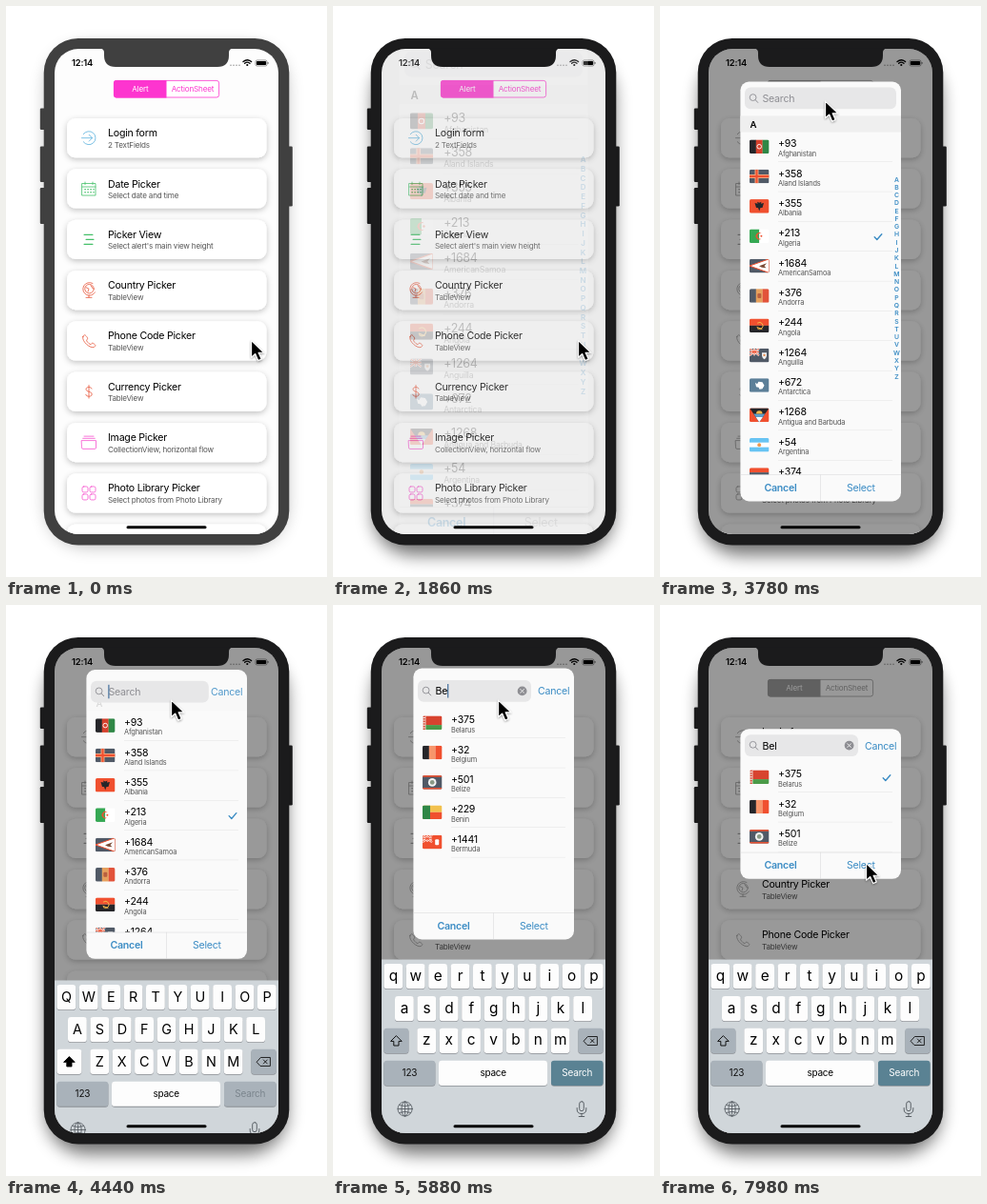
Animation, 337 px wide and 600 px high, one loop 8 s. Source, as an HTML page:

```html
<!DOCTYPE html>
<html lang="en">
<head>
<meta charset="utf-8">
<title>Country picker demo</title>
<style>
  html, body { margin: 0; width: 100%; height: 100%; overflow: hidden; background: #fff; }
  svg { display: block; width: 100vw; height: 100vh; }
  text { font-family: Inter, "Liberation Sans", sans-serif; letter-spacing: -.022em; white-space: pre; }
</style>
</head>
<body>
<svg viewBox="0 0 337 600">
  <defs>
    <clipPath id="screen"><rect x="51" y="45" width="235" height="510" rx="25"/></clipPath>
    <clipPath id="flag"><rect width="20.5" height="14.6" rx="1.6"/></clipPath>
    <filter id="soft" x="-20%" y="-20%" width="140%" height="150%"><feGaussianBlur stdDeviation="9"/></filter>
    <filter id="card" x="-10%" y="-30%" width="120%" height="180%">
      <feDropShadow dx="0" dy="2" stdDeviation="3" flood-opacity=".24"/>
    </filter>
    <filter id="arrow" x="-50%" y="-50%" width="200%" height="200%">
      <feDropShadow dx="0" dy="1" stdDeviation=".9" flood-opacity=".4"/>
    </filter>
  </defs>
  <g id="stage"></g>
</svg>
<script>
const LOOP = 8000, STEP = 60;
const BLUE = '#3b8cc4', GREY = '#a0a0a0', PINK = '#fd35cf';
const RED = '#f0502f', INK = '#26262a', SLATE = '#505966';

// timing helpers
const at = (table, t) => table.reduce((v, [time, val]) => time <= t ? val : v, table[0][1]);
const mix = (a, b, k) => a + (b - a) * k;
const ease = k => { k = Math.min(1, Math.max(0, k)); return k * k * (3 - 2 * k); };
function track(points, t) {
  const i = points.findIndex(p => p[0] > t);
  if (i < 0) return points[points.length - 1].slice(1);
  if (!i) return points[0].slice(1);
  const a = points[i - 1], b = points[i], k = (t - a[0]) / (b[0] - a[0]);
  return [mix(a[1], b[1], k), mix(a[2], b[2], k)];
}

const CURSOR = [
  [2400, 257, 351], [2520, 247, 322], [2700, 222, 252], [2820, 217, 253],
  [3240, 217, 253], [3480, 190, 175], [3660, 168, 104], [3720, 170, 98], [3780, 173, 99.5],
  [6240, 173, 99.5], [6420, 178, 119], [6480, 182, 141], [6600, 188, 173], [6780, 189, 182],
  [7380, 189, 182], [7560, 200, 225], [7740, 212, 283], [7860, 216, 289], [7980, 216, 271]
];
const CARET = [[0, 0], [4260, 1], [4800, .6], [4860, .3], [4920, 0], [5220, .5], [5280, 1],
  [6960, .75], [7020, .5], [7140, .25], [7200, 0], [7440, .5], [7500, 1], [7920, .5], [7980, 0]];
const SHOW = [[0, 0], [1860, .2], [1980, .92], [2160, 1]];
const ZOOM = [[0, 1.176], [1980, 1.02], [2160, 1]];
const DIM = [[0, 0], [1860, .07], [1980, .4]];
const FOCUS = [[0, 0], [4260, .03], [4440, .88], [4620, 1]];
const QUERY = [[0, ''], [5700, 'B'], [5880, 'Be'], [6060, 'Bel']];
const CARET_X = [107.8, 115, 120.6, 123.2];

// drawing helpers
const rect = (x, y, w, h, fill, o = '') => `<rect x="${x}" y="${y}" width="${w}" height="${h}" fill="${fill}" ${o}/>`;
const path = (d, o = '') => `<path d="${d}" ${o}/>`;
const dot = (x, y, r, fill, o = '') => `<circle cx="${x}" cy="${y}" r="${r}" fill="${fill}" ${o}/>`;
const text = (x, y, s, size, fill = '#000', o = '') => `<text x="${x}" y="${y}" font-size="${size}" fill="${fill}" ${o}>${s}</text>`;
const move = (x, y, s, o = '') => `<g transform="translate(${x} ${y})" ${o}>${s}</g>`;
const line = (c, w = .8) => `fill="none" stroke="${c}" stroke-width="${w}" stroke-linecap="round" stroke-linejoin="round"`;
const MID = 'text-anchor="middle"', BOLD = 'font-weight="600"';

// flags, 20.5 by 14.6
const bandsH = cs => cs.map((c, i) => rect(0, i * 14.6 / cs.length, 20.5, 14.6 / cs.length + .1, c)).join('');
const bandsV = cs => cs.map((c, i) => rect(i * 20.5 / cs.length, 0, 20.5 / cs.length + .1, 14.6, c)).join('');
const jack = path('M0 0L10 7.3M10 0L0 7.3M5 0V7.3M0 3.6H10', 'stroke="#fff" stroke-width="2"') +
  path('M5 0V7.3M0 3.6H10M0 0L10 7.3M10 0L0 7.3', `stroke="${RED}" stroke-width=".9"`);
const FLAGS = {
  Afghanistan: bandsV([INK, '#d5402c', '#2f8746']) + dot(10.2, 7.3, 2.3, 'none', 'stroke="#fff" stroke-width=".9"'),
  'Aland Islands': rect(0, 0, 20.5, 14.6, SLATE) + path('M7.5 0V14.6M0 7.3H20.5', 'stroke="#f2a27c" stroke-width="4"') +
    path('M7.5 0V14.6M0 7.3H20.5', `stroke="${RED}" stroke-width="2"`),
  Albania: rect(0, 0, 20.5, 14.6, RED) + path('M10.2 3.6L8 2.6L8.6 4.6L5.5 4L7 9L9 9L10.2 12.4L11.5 9L13.5 9L15 4L11.9 4.6L12.5 2.6Z', `fill="${INK}"`),
  Algeria: bandsV(['#35a853', '#fff']) + path('M12.6 4.6A3.6 3.6 0 1 0 12.6 10A3 3 0 1 1 12.6 4.6Z', `fill="${RED}"`) + dot(12.4, 7.3, 1, RED),
  AmericanSamoa: rect(0, 0, 20.5, 14.6, SLATE) + path('M0 7.3L20.5 0V14.6Z', `fill="#fff" stroke="${RED}" stroke-width="1"`) +
    path('M10 7.5L18 4.5L15.5 7.5L17.5 9.5L13 9Z', 'fill="#7b4a35"'),
  Andorra: bandsV([SLATE, '#e6a05c', '#e2533a']) + rect(8.3, 4.8, 4, 5, '#b9603f', 'rx="1"'),
  Angola: bandsH([RED, INK]) + path('M8.5 4.5A3.6 3.6 0 1 1 8.3 10.4M8 9L13 11', line('#f4b64a', 1)),
  Anguilla: rect(0, 0, 20.5, 14.6, SLATE) + jack + path('M13 4.5H18V8Q17.5 10.5 15.5 11.3Q13.5 10.5 13 8Z', 'fill="#eee"') + dot(15.5, 7, 1.2, '#e58a4f'),
  Antarctica: rect(0, 0, 20.5, 14.6, '#5c7f98') + path('M6 4.5L8 6L9.5 3.5L13.5 4L15.5 7.5L13.5 11L10.5 11.5L9.5 9.5L7 9Z', 'fill="#fff"'),
  'Antigua and Barbuda': rect(0, 0, 20.5, 14.6, RED) + path('M0 0H20.5L10.2 14.6Z', `fill="${INK}"`) + path('M4.2 6H16.3L10.2 14.6Z', 'fill="#5d9cc9"') +
    path('M6.7 9.5H13.8L10.2 14.6Z', 'fill="#fff"') + path('M7 6A3.2 3.2 0 0 1 13.5 6Z', 'fill="#f5b54a"'),
  Argentina: bandsH(['#68c4f3', '#fff', '#68c4f3']) + dot(10.2, 7.3, 1.9, '#f1964a'),
  Armenia: bandsH([RED, SLATE, '#f0a04b']),
  Bahamas: bandsH(['#4cb3c9', '#f2c14e', '#4cb3c9']) + path('M0 0L9 7.3L0 14.6Z', `fill="${INK}"`),
  Bahrain: rect(0, 0, 20.5, 14.6, RED) + path('M0 0H6L8 1.5L6 3L8 4.5L6 6L8 7.5L6 9L8 10.5L6 12L8 13.5L6 14.6H0Z', 'fill="#fff"'),
  Bangladesh: rect(0, 0, 20.5, 14.6, '#2f8746') + dot(9, 7.3, 4, RED),
  Barbados: bandsV([SLATE, '#f2c14e', SLATE]) + path('M8.5 5V7H12V5M10.2 4V11', line(INK, 1)),
  Belarus: rect(0, 0, 20.5, 9.8, '#d8432f') + rect(0, 9.7, 20.5, 5, '#4b9a48') + rect(0, 0, 3.4, 14.6, '#f3e6e2') +
    path('M1.7 0V14.6', 'stroke="#d8432f" stroke-width="2" stroke-dasharray="1.6 1"'),
  Belgium: bandsV([INK, '#f7956b', RED]),
  Belize: rect(0, 0, 20.5, 14.6, SLATE) + rect(0, 0, 20.5, 1.6, RED) + rect(0, 13, 20.5, 1.6, RED) + dot(10.2, 7.3, 4.3, '#f4f4f4') + dot(10.2, 7.3, 2.4, '#8a9a86'),
  Benin: rect(0, 0, 20.5, 7.3, '#f2c14e') + rect(0, 7.3, 20.5, 7.3, RED) + rect(0, 0, 8, 14.6, '#2f8746'),
  Bermuda: rect(0, 0, 20.5, 14.6, RED) + jack + rect(13.2, 4.5, 4, 6, '#fff', 'rx="1"')
};
const A_ROWS = [['+93', 'Afghanistan'], ['+358', 'Aland Islands'], ['+355', 'Albania'], ['+213', 'Algeria'], ['+1684', 'AmericanSamoa'],
  ['+376', 'Andorra'], ['+244', 'Angola'], ['+1264', 'Anguilla'], ['+672', 'Antarctica'], ['+1268', 'Antigua and Barbuda'], ['+54', 'Argentina'], ['+374', 'Armenia']];
const B_ROWS = [['+1242', 'Bahamas'], ['+973', 'Bahrain'], ['+880', 'Bangladesh'], ['+1246', 'Barbados'], ['+375', 'Belarus'],
  ['+32', 'Belgium'], ['+501', 'Belize'], ['+229', 'Benin'], ['+1441', 'Bermuda']];
const found = q => q ? B_ROWS.filter(r => r[1].startsWith(q)) : A_ROWS;

// menu behind the alert
const ICONS = {
  login: path('M-5.8-4A7 7 0 1 1-5.8 4M-7.5 0H3.5M.2-3.4L3.5 0L.2 3.4'),
  date: path('M-7-5.5H7V7H-7ZM-7-2H7M-4-7V-4.5M4-7V-4.5') + path('M-4 .8H5M-4 3.8H5', 'stroke-width="1.5" stroke-dasharray=".2 2.8"'),
  lines: path('M-5-5H4M-3 0H5M-5 5H4', 'stroke-width="1.1"'),
  globe: dot(.5, -1.5, 4.7, 'none') + path('M4-7.2A6.8 6.8 0 1 0 6.5 2.2M0 5.3V7.5M-3 7.7H3M-3-3L0-1.5L-1 1.5M2-5L4-2'),
  phone: path('M-6.2-4.5C-5-7.5-3.5-6.5-1.5-3.3C-.7-1.8-3-1.2-2.3 0C-1 2 .8 3.5 2 3.6C3 3.4 3 1.6 4.5 2.4C7.6 4.4 7.3 5 5.5 6.4C2 8.5-8 .5-6.2-4.5Z'),
  money: path('M3-3.2C2.5-5.5-3-5.5-3-2.6C-3 .5 3.2-.6 3.2 2.7C3.2 5.8-3 5.6-3.3 3M0-6.8V6.8'),
  stack: path('M-5-6.5H5M-6.3-4.3H6.3M-7.5-2H7.5V5.5Q7.5 6.8 6.2 6.8H-6.2Q-7.5 6.8-7.5 5.5Z'),
  grid: [[-7, -7], [1, -7], [-7, 1], [1, 1]].map(([x, y]) => rect(x, y, 6, 6, 'none', 'rx="1.7"')).join('')
};
const MENU = [
  ['login', '#5bb2de', 'Login form', '2 TextFields'],
  ['date', '#46c06a', 'Date Picker', 'Select date and time'],
  ['lines', '#46c06a', 'Picker View', "Select alert's main view height"],
  ['globe', '#e8573c', 'Country Picker', 'TableView'],
  ['phone', '#e8573c', 'Phone Code Picker', 'TableView'],
  ['money', '#e8573c', 'Currency Picker', 'TableView'],
  ['stack', '#f653d0', 'Image Picker', 'CollectionView, horizontal flow'],
  ['grid', '#f653d0', 'Photo Library Picker', 'Select photos from Photo Library']
];

function menu(muted) {
  const tint = muted ? GREY : PINK;
  let s = rect(51, 45, 235, 510, '#fdfdfd') +
    rect(113.4, 78.4, 110.2, 17.6, '#fff', `rx="2.5" stroke="${tint}" stroke-width=".8"`) +
    path('M168.5 78H115.5Q113 78 113 80.5V94Q113 96.4 115.5 96.4H168.5Z', `fill="${tint}"`) +
    text(140.8, 90.1, 'Alert', 8.1, '#fff', MID) + text(196, 90.1, 'ActionSheet', 8.1, tint, MID);
  for (let i = 0; i < 9; i++) {
    const y = 118 + i * 53.32;
    s += rect(64, y, 209.5, 41.3, '#fff', 'rx="9" filter="url(#card)"');
    if (!MENU[i]) continue;
    const [icon, color, title, note] = MENU[i];
    s += move(87, y + 20.7, ICONS[icon], line(muted ? GREY : color)) +
      text(107, y + 19.2, title, 10.6) + text(107, y + 30.7, note, 8.05, '#555', 'letter-spacing="0"');
  }
  return s;
}

const status = text(69, 63.4, '12:14', 9.4, '#000', BOLD) +
  [236, 239, 242, 245].map(x => dot(x, 62.2, .8, '#999')).join('') +
  path('M249 58.6Q253.3 54.8 257.6 58.6M250.6 60.3Q253.3 58 256 60.3', line('#000', 1.3)) + dot(253.3, 62, 1.1, '#000') +
  rect(262, 57, 12, 6, 'none', 'rx="1.6" stroke="#555" stroke-width=".6"') + rect(262.9, 57.9, 10.2, 4.2, '#000', 'rx=".8"') +
  rect(274.6, 59, .9, 2, '#555', 'rx=".4"');

// phone body
function shell(active) {
  const c = active ? '#1b1b1c' : '#404040';
  const side = (x, y, h) => rect(x, y, 6, h, c, 'rx="1.2"');
  return rect(42, active ? 52 : 42, 253, active ? 525 : 526, '#000', `rx="42" filter="url(#soft)" opacity="${active ? .55 : .26}"`) +
    side(35.8, 107.5, 22.5) + side(35.8, 147.5, 37.5) + side(35.8, 191, 38) + side(294.8, 147.5, 63) +
    rect(39.7, 34, 257.6, 532.5, c, 'rx="36"');
}
const notch = c => path('M99 44.5Q103 45 103 49V52Q103 64 115 64H222Q234 64 234 52V49Q234 45 238 44.5Z', `fill="${c}"`);

const check = (x, y) => path(`M${x - 3.8} ${y}l2.6 2.8l5-5.8`, line(BLUE, 1.4));

function row([code, name], y, sel, x) {
  const c = y + 15.7;
  return move(94, c - 7.8, FLAGS[name], 'clip-path="url(#flag)"') +
    text(124, c + .1, code, 10.6) + text(124, c + 9.4, name, 7.4, '#555') +
    rect(124, y + 31, 120, .4, '#dcdcdc') + (sel ? check(x, c - .2 + .7) : '');
}

function alertBox(t) {
  const p = at(FOCUS, t), q = ease((t - 5880) / 420), query = at(QUERY, t);
  const h = mix(mix(441, 285, p), 157.6, q), top = mix(300, 209, p) - h / 2, end = top + h - 28;
  const fy = top + 6 + 6.5 * p * (1 - q), fw = mix(159, 119, p), start = top + 53 - 11 * p - 6.7 * q;
  const chosen = t >= 6960 ? 'Belarus' : t >= 3000 ? 'Algeria' : '';
  const clipTop = start - (1 - p) * 17;
  let s = `<clipPath id="list"><rect x="84" y="${clipTop}" width="170" height="${end - clipTop}"/></clipPath>` +
    rect(84.4, top, 168.6, h, '#fafafa', 'rx="9"');
  s += `<g clip-path="url(#list)">` + found(query).map((r, i) => row(r, start + i * 31.35, r[1] === chosen, p > .5 ? 238 : 229)).join('') + '</g>';
  if (p < 1) {
    let index = rect(84.4, start - 17, 168.6, 17, '#efefef') + text(94.5, start - 4.6, 'A', 9.6, '#000', BOLD);
    for (let i = 0; i < 26 && p < .5; i++)
      index += text(248.4, top + 105 + i * 8.28, String.fromCharCode(65 + i), 6.8, BLUE, MID + ' ' + BOLD);
    s += `<g opacity="${1 - p}">${index}</g>`;
  }
  s += rect(89, fy, fw, 22.8, '#e7e7e8', 'rx="6"') +
    path(`M100.3 ${fy + 13.3}l2.4 2.6`, line('#8e8e93', 1)) + dot(97.6, fy + 10.6, 3.4, 'none', 'stroke="#8e8e93" stroke-width=".9"') +
    text(107.5, fy + 15.3, query || 'Search', 10.6, query ? '#000' : '#8e8e93') +
    rect(CARET_X[query.length] - .5, fy + 4, 1.2, 14.5, '#426f9c', `opacity="${at(CARET, t)}"`);
  if (query) s += dot(198.6, fy + 11.4, 4.9, '#8e8e93') + path(`M196.8 ${fy + 9.6}l3.6 3.6m0-3.6l-3.6 3.6`, line('#eee', 1));
  if (p) s += text(215, fy + 15.4, 'Cancel', 10.6, BLUE, `opacity="${p}"`);
  s += rect(84.4, end, 168.6, .5, '#d4d4d6') + rect(168.5, end, .5, 28, '#d4d4d6') +
    text(126.5, end + 17.6, 'Cancel', 10.6, BLUE, MID + ' ' + BOLD) +
    text(210.8, end + 17.6, 'Select', 10.6, chosen ? BLUE : '#a8a8aa', MID);
  const z = at(ZOOM, t);
  return `<g opacity="${at(SHOW, t)}" transform="translate(168.5 300) scale(${z}) translate(-168.5 -300)">${s}</g>`;
}

function keyboard(p, lower) {
  const key = (x, y, w, fill) => rect(x, y + .8, w, 26.2, '#8b8f94', 'rx="3.2"') + rect(x, y, w, 26.2, fill, 'rx="3.2"');
  const dark = '#a9b2ba', size = lower ? 15.4 : 14.4;
  let s = rect(51, 372.5, 235, 183, '#d0d6da');
  [['QWERTYUIOP', 63.3, 377], ['ASDFGHJKL', 74.9, 411], ['ZXCVBNM', 98.2, 444.8]].forEach(([keys, x0, y]) => {
    [...keys].forEach((k, i) => {
      const x = x0 + i * 23.4;
      s += key(x - 9.9, y, 19.8, '#fdfdfd') + text(x, y + (lower ? 17.6 : 18.3), lower ? k.toLowerCase() : k, size, '#000', MID);
    });
  });
  s += key(53.4, 444.8, 26, lower ? dark : '#fdfdfd') +
    path('M66.4 452.6L72.2 458.4H69V463H63.8V458.4H60.6Z', `fill="${lower ? 'none' : '#000'}" stroke="#000" stroke-width=".9" stroke-linejoin="round"`) +
    key(257.4, 444.8, 26.2, dark) + path('M263.4 458L267.4 453.5H277.4V462.5H267.4ZM270.3 456l4 4m0-4l-4 4', line('#111', .9)) +
    key(53.4, 478.7, 54, dark) + text(80.4, 495.1, '123', 10, '#111', MID) +
    key(111, 478.7, 114, '#fdfdfd') + text(168.2, 495.1, 'space', 10, '#000', MID) +
    key(229, 478.7, 54.6, lower ? '#5a8293' : dark) + text(256.3, 495.1, 'Search', 10, lower ? '#fff' : '#7b858d', MID) +
    move(75.6, 529.5, dot(0, 0, 7.6, 'none') + '<ellipse rx="3.6" ry="7.6"/>' + path('M-7.6 0H7.6M0-7.6V7.6M-6-4Q0-1.5 6-4M-6 4Q0 1.5 6 4'), line('#50565c', .8)) +
    move(261, 529.5, rect(-2.3, -7.8, 4.6, 10, 'none', 'rx="2.3"') + path('M-4.8-1V.5Q-4.8 5 0 5Q4.8 5 4.8.5V-1M0 5V8M-2.8 8H2.8'), line('#50565c', .9));
  return move(0, 183 * (1 - p), s);
}

const pointer = path('M0 0V17.6L4.1 13.9L7.2 21L10.6 19.5L7.5 12.7H13.2Z',
  'fill="#000" stroke="#fff" stroke-width="1.1" stroke-linejoin="round" filter="url(#arrow)"');

function scene(t) {
  const active = t >= 960, dim = at(DIM, t), p = at(FOCUS, t), [x, y] = track(CURSOR, t);
  let s = menu(dim > .1) + status;
  if (dim) s += rect(51, 45, 235, 510, '#000', `opacity="${dim}"`) + alertBox(t);
  if (p) s += keyboard(p, t >= 5700);
  s += rect(126.5, 546.2, 84, 3, '#000', 'rx="1.5"');
  return shell(active) + `<g clip-path="url(#screen)">${s}</g>` + notch(active ? '#1b1b1c' : '#404040') + move(x + .6, y + .6, pointer);
}

const stage = document.getElementById('stage');
let last = '';
function frame() {
  const t = performance.now() % LOOP, next = scene(Math.floor(t / STEP) * STEP);
  if (next !== last) stage.innerHTML = last = next;
  requestAnimationFrame(frame);
}
frame();
</script>
</body>
</html>
```
